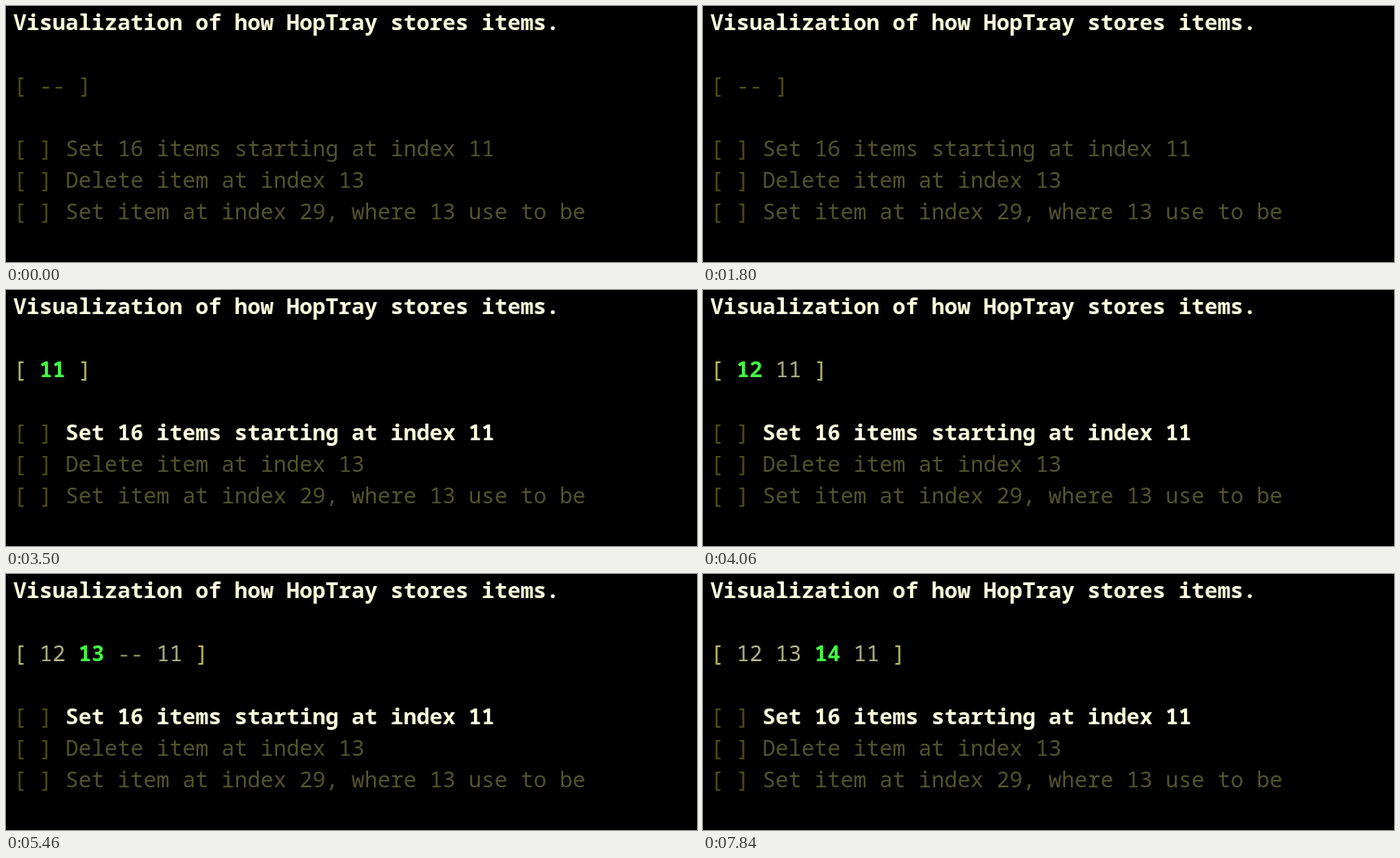
An HTML page for the animation above (8000 ms loop, 744 by 276 pixels).

```html
<!DOCTYPE html>
<html lang="en">
<head>
<meta charset="utf-8">
<title>Stored items</title>
<style>
  html, body { margin: 0; width: 100%; height: 100%; overflow: hidden; background: #000; }
  pre {
    margin: 0; padding-left: 8px;
    font: 23.3333px/34px "Noto Sans Mono", monospace;
    color: #b4b48c;
  }
  b { font-weight: 600; color: #ffffe0; }
  .new { color: #44ff44; }
  .bracket { color: #c0c060; }
  .empty { color: #85855e; }
  .dim { color: #53532f; }
  .dim .bracket, .dim .empty { color: #4f4f14; }
</style>
</head>
<body>
<pre id="screen"></pre>
<script>
const LOOP = 8000;
const TITLE = "Visualization of how HopTray stores items.";
const TASKS = [
  "Set 16 items starting at index 11",
  "Delete item at index 13",
  "Set item at index 29, where 13 use to be",
];
// Slots of the store from each moment on; "latest" is the item just added.
const STATES = [
  { at: 0, slots: "--" },
  { at: 2660, slots: "11", latest: "11" },
  { at: 4060, slots: "12 11", latest: "12" },
  { at: 5460, slots: "12 13 -- 11", latest: "13" },
  { at: 6880, slots: "12 13 14 11", latest: "14" },
];

const screen = document.getElementById("screen");
const span = (name, text) => `<span class="${name}">${text}</span>`;
const bracketed = text => span("bracket", "[") + ` ${text}` + span("bracket", "]");

function slotMarkup(slot, latest) {
  if (slot === latest) return `<b class="new">${slot}</b>`;
  return slot === "--" ? span("empty", slot) : slot;
}

function markup({ slots, latest }) {
  const items = slots.split(" ").map(slot => slotMarkup(slot, latest)).join(" ");
  const row = bracketed(items + " ");
  const tasks = TASKS.map((task, i) =>
    span("dim", bracketed("")) + " " +
    (latest && i === 0 ? `<b>${task}</b>` : span("dim", task)));
  return [`<b>${TITLE}</b>`, "", latest ? row : span("dim", row), "", ...tasks].join("\n");
}

let shown;
function draw() {
  const time = performance.now() % LOOP;
  const state = STATES.findLast(s => s.at <= time);
  if (state !== shown) {
    screen.innerHTML = markup(state);
    shown = state;
  }
  requestAnimationFrame(draw);
}
draw();
</script>
</body>
</html>
```
